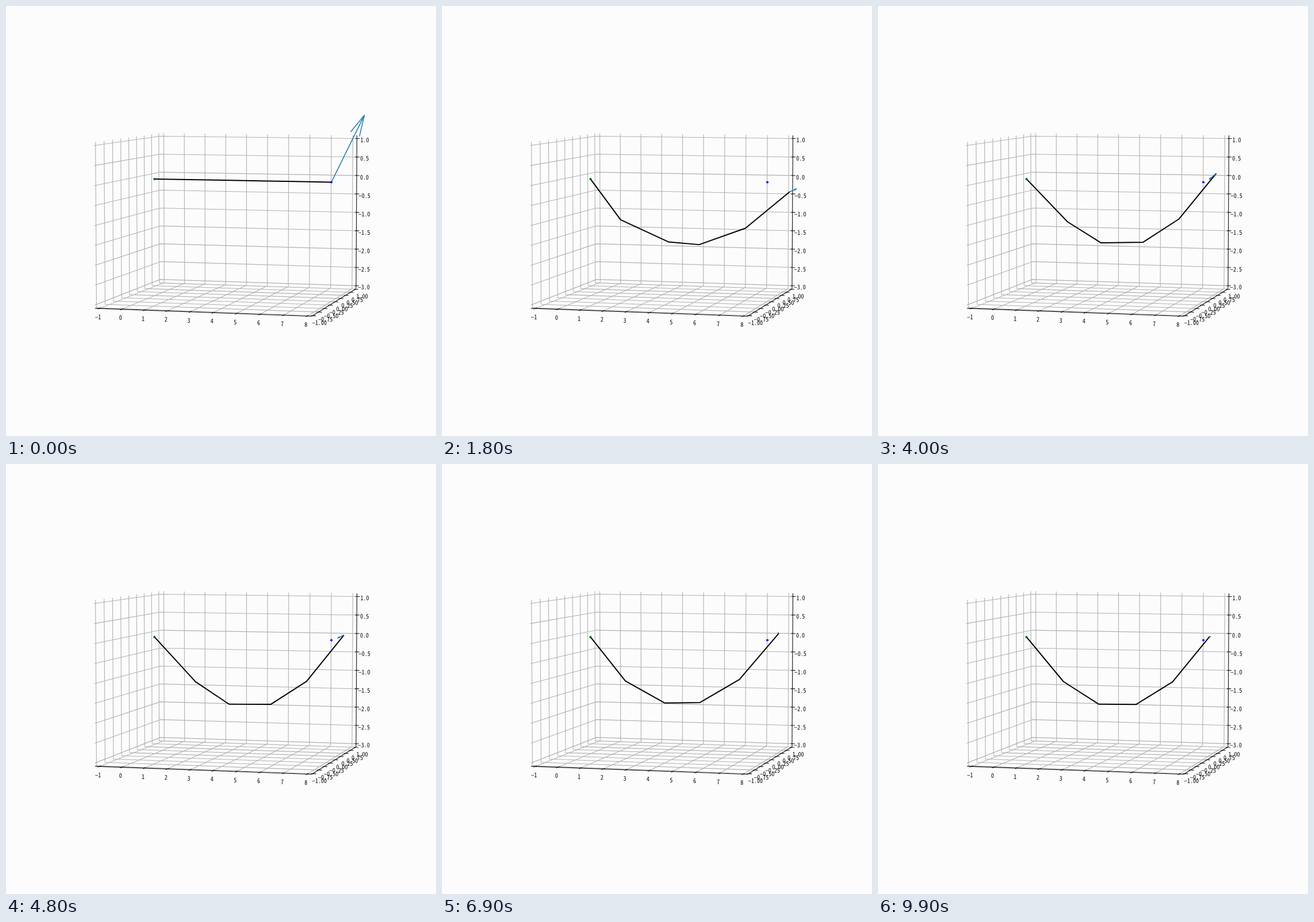
These frames come from a looping animation (748 px wide and 748 px high, 10 s). An HTML page with a canvas:

```html
<!DOCTYPE html>
<html lang="en">
<head>
<meta charset="utf-8">
<title>Hanging chain</title>
<style>
html, body { margin: 0; width: 100%; height: 100%; overflow: hidden; background: #fcfcfc; }
canvas { display: block; }
</style>
</head>
<body>
<canvas id="stage" width="748" height="748"></canvas>
<script>
const ctx = document.getElementById('stage').getContext('2d');
const { sin, cos, exp, PI } = Math;
const LOOP = 10000, STEP = 100, LINKS = 5, SPAN = 8;

// limits of each axis, with a margin of 1/48 beyond the outer ticks
const axisOf = (min, max, size) => {
  const pad = (max - min) / 48;
  return { lo: min - pad, hi: max + pad, mid: (min + max) / 2, scale: size / (max - min + 2 * pad) };
};
const X = axisOf(-1, 8, 1.143), Y = axisOf(-1, 1, 1.143), Z = axisOf(-3, 1, 0.857);

const TURN = 15 * PI / 180, TILT = 5 * PI / 180;
const DISTANCE = 10, ZOOM = 3250, CENTER = [391, 370];

function project(x, y, z) {
  const u = (x - X.mid) * X.scale, v = (y - Y.mid) * Y.scale, w = (z - Z.mid) * Z.scale;
  const right = u * cos(TURN) + v * sin(TURN);
  const away = v * cos(TURN) - u * sin(TURN);
  const up = w * cos(TILT) + away * sin(TILT);
  const k = ZOOM / (DISTANCE + away * cos(TILT) - w * sin(TILT));
  return [CENTER[0] + right * k, CENTER[1] - up * k];
}

const range = (n, f) => Array.from({ length: n }, (_, i) => f(i));

function stroke(points, color, width) {
  ctx.beginPath();
  points.forEach(([x, y], i) => i ? ctx.lineTo(x, y) : ctx.moveTo(x, y));
  ctx.strokeStyle = color;
  ctx.lineWidth = width;
  ctx.stroke();
}

const line = (color, ...points) => stroke(points.map(p => project(...p)), color, 1.1);
const grid = (...points) => line('#b0b0b0', ...points);
const axis = (...points) => line('#111', ...points);

function dot([x, y], color) {
  ctx.fillStyle = color;
  ctx.beginPath();
  ctx.arc(x, y, 2, 0, 2 * PI);
  ctx.fill();
}

function label(value, digits, point, dx, dy) {
  const [x, y] = project(...point);
  ctx.fillStyle = '#000';
  ctx.fillText(value.toFixed(digits).replace('-', '\u2212'), x + dx, y + dy);
}

function drawAxes() {
  ctx.font = '10px "Noto Sans Mono CJK JP", "Noto Sans Mono", monospace';
  ctx.textAlign = 'center';
  ctx.textBaseline = 'middle';
  const xs = range(10, i => i - 1);
  const ys = range(9, i => i / 4 - 1);
  const zs = range(9, i => 1 - i / 2);

  xs.forEach(x => grid([x, Y.lo, Z.lo], [x, Y.hi, Z.lo], [x, Y.hi, Z.hi]));
  ys.forEach(y => grid([X.lo, y, Z.hi], [X.lo, y, Z.lo], [X.hi, y, Z.lo]));
  zs.forEach(z => grid([X.lo, Y.lo, z], [X.lo, Y.hi, z], [X.hi, Y.hi, z]));

  axis([X.lo, Y.lo, Z.lo], [X.hi, Y.lo, Z.lo]);
  axis([X.hi, Y.lo, Z.lo], [X.hi, Y.hi, Z.lo]);
  axis([X.hi, Y.hi, Z.lo], [X.hi, Y.hi, Z.hi]);

  xs.forEach(x => {
    axis([x, Y.lo - 0.05, Z.lo], [x, Y.lo + 0.05, Z.lo]);
    label(x, 0, [x, Y.lo, Z.lo], -2.2, 15);
  });
  ys.forEach(y => {
    axis([X.hi - 0.06, y, Z.lo], [X.hi + 0.14, y, Z.lo]);
    label(y, 2, [X.hi, y, Z.lo], 12, 12.8);
  });
  zs.forEach(z => {
    axis([X.hi - 0.07, Y.hi, z], [X.hi + 0.13, Y.hi, z]);
    label(z, 1, [X.hi, Y.hi, z], 13.5, 3);
  });
}

// the free end swings out, settles, then creeps back to its goal
function endAt(t) {
  const drift = (1 - ((t - 5) / 7) ** 2) * (1 - exp(-2 * t));
  return [
    SPAN + 0.54 * drift + 5.6 * t * exp(-1.6 * t),
    0.19 * drift + 1.8 * exp(-0.72 * t) * sin(2.24 * t)
  ];
}

const pullAt = t => [
  1.43 * exp(-0.35 * t) * cos(0.65 * t),
  1.72 * exp(-0.6 * t) * cos(0.8 * t)
];

// parabolic sag that bounces, plus a fading sideways ripple
function chainAt(t) {
  const [endX, endZ] = endAt(t);
  const sag = 0.293 * (1 - exp(-t) * (cos(3.3 * t) + 0.3 * sin(3.3 * t)));
  const ripple = 0.75 * exp(-0.27 * t) * cos(1.16 * (t - 4.6)) * (1 - exp(-2 * t));
  return range(LINKS + 1, i => {
    const s = i / LINKS;
    const wave = 0.65 * sin(PI * s) + 0.5 * sin(4 * PI * s) + 0.25 * sin(3 * PI * s);
    return [endX * s + ripple * wave, endZ * s - sag * i * (LINKS - i)];
  });
}

function drawArrow([x, y], tip) {
  const dx = tip[0] - x, dy = tip[1] - y;
  const len = Math.hypot(dx, dy) * 0.29, angle = Math.atan2(dy, dx);
  const barb = turn => [tip[0] - len * cos(angle + turn), tip[1] - len * sin(angle + turn)];
  stroke([[x, y], tip], '#1f77b4', 1.5);
  stroke([barb(0.23), tip, barb(-0.23)], '#1f77b4', 1.5);
}

function draw(now) {
  const t = Math.floor(now % LOOP / STEP) * STEP / 1000;
  const flat = ([x, z]) => project(x, 0, z);
  const chain = chainAt(t), end = chain[LINKS], pull = pullAt(t);
  ctx.fillStyle = '#fcfcfc';
  ctx.fillRect(0, 0, 748, 748);
  ctx.lineJoin = 'round';
  drawAxes();
  stroke(chain.map(flat), '#000', 2);
  dot(flat([0, 0]), '#006400');
  dot(flat([SPAN, 0]), '#00f');
  drawArrow(flat(end), flat([end[0] + pull[0], end[1] + pull[1]]));
}

const start = performance.now();
function loop() {
  draw(performance.now() - start);
  requestAnimationFrame(loop);
}
loop();
</script>
</body>
</html>
```
